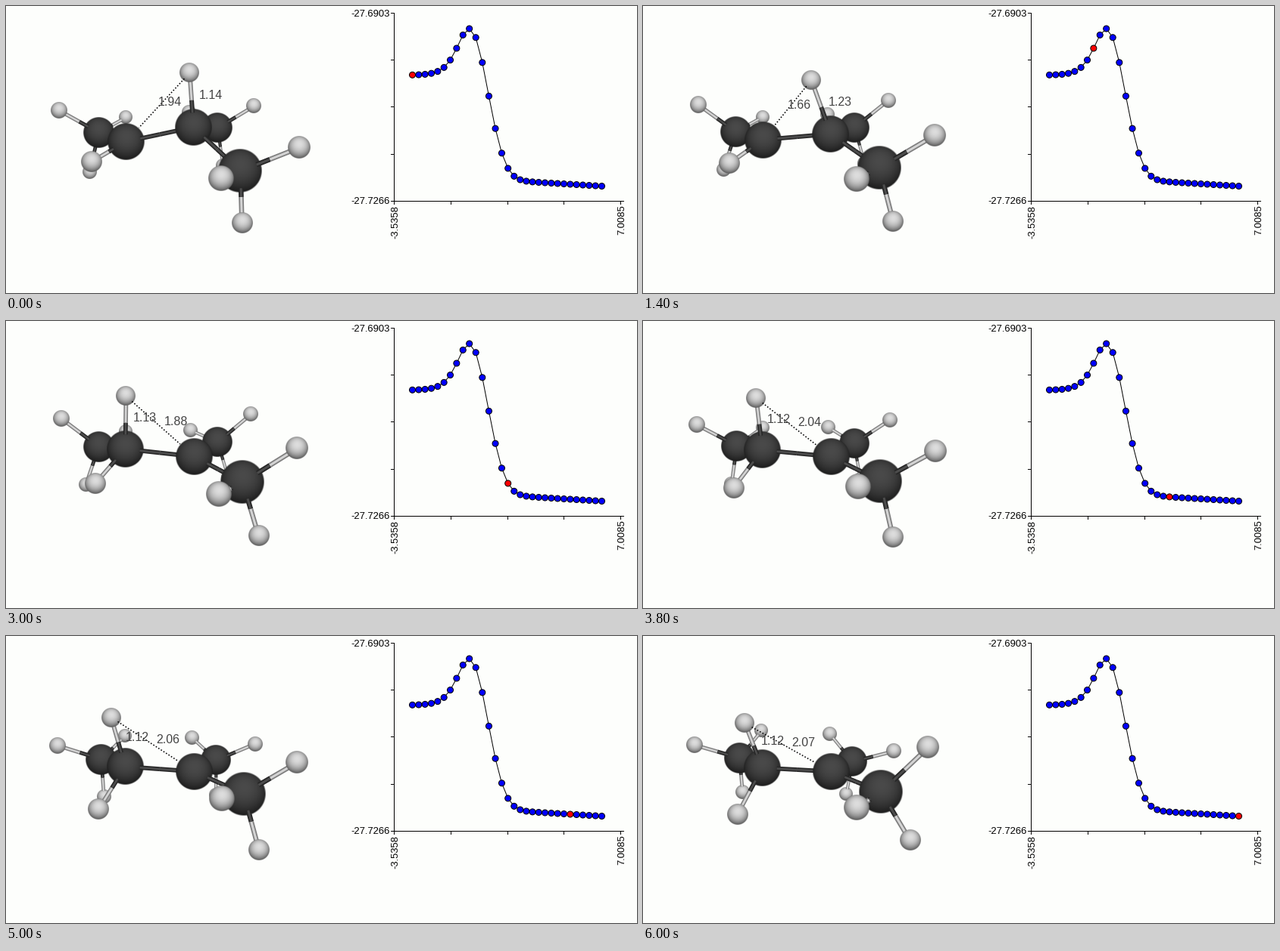
These frames come from a looping animation (833x380 px, 6200 ms). A matplotlib script:

```python
import numpy as np
import matplotlib.pyplot as plt
from matplotlib.animation import FuncAnimation

W, H, DPI = 833, 380, 100
FRAMES, STEP = 31, 200
HOP_END, SWING_END = 15, 23
PT = 72 / DPI
T = np.arange(FRAMES)

plt.rcParams["font.family"] = "Liberation Sans"
fig = plt.figure(figsize=(W / DPI, H / DPI), dpi=DPI, facecolor="#fdfefc")
ax = fig.add_axes([0, 0, 1, 1])
ax.set_xlim(-0.5, W - 0.5)
ax.set_ylim(H - 0.5, -0.5)
ax.axis("off")


# Easings for the first half of the motion
def settle(t):
    return 1 - (1 - t) ** 3


def steady(t):
    return t


def hop(t):
    u = t ** 1.5
    return u * u * (3 - 2 * u)


STOPS = {2: (0, HOP_END), 3: (0, HOP_END, FRAMES - 1),
         4: (0, HOP_END, SWING_END, FRAMES - 1)}


def travel(points, ease):
    """Eased into the second pose, then steady through the later ones."""
    time = np.where(T < HOP_END, HOP_END * ease(np.minimum(T / HOP_END, 1)), T)
    return np.column_stack([np.interp(time, STOPS[len(points)], c)
                            for c in zip(*points)])


def sphere(lo, hi, n=72):
    """Shaded ball with a soft highlight just above its centre."""
    y, x = np.mgrid[-1:1:n * 1j, -1:1:n * 1j]
    r = np.hypot(x, y)
    z = np.sqrt(np.clip(1 - r ** 2, 0, 1))
    light = np.clip(0.02 * x - 0.3 * y + 0.95 * z, 0, 1)
    img = np.empty((n, n, 4))
    img[..., :3] = (lo + (hi - lo) * light ** 1.3)[..., None]
    img[..., 3] = np.clip((1 - r) * n / 4 + 0.5, 0, 1)
    return img


BALLS = {"C": sphere(0.12, 0.29), "H": sphere(0.38, 0.87)}
TUBES = {"C": ("#262626", "#4c4c4c"), "H": ("#808080", "#d4d4d4")}


class Atom:
    def __init__(self, kind, radius, depth, *points, ease=settle):
        self.kind, self.r, self.z = kind, radius, depth
        self.path = travel(points, ease)
        self.img = ax.imshow(BALLS[kind], extent=(0, 1, 1, 0), aspect="auto",
                             interpolation="hanning", zorder=depth)

    def place(self, i):
        x, y = self.path[i]
        r = self.r + 0.5
        self.img.set_extent((x - r, x + r, y + r, y - r))


class Bond:
    """Two-tone tube, each half in the tone of its atom."""

    def __init__(self, a, b):
        self.far, self.near = sorted((a, b), key=lambda p: p.z)
        width = 4 + 0.2 * self.far.z
        self.parts = []
        for atom in (self.far, self.near):
            for color, w in zip(TUBES[atom.kind], (width, width * 0.45)):
                line, = ax.plot([], [], color=color, lw=w * PT,
                                solid_capstyle="butt", zorder=self.far.z + 0.5)
                self.parts.append(line)

    def place(self, i, visible=True):
        p, q = self.far.path[i], self.near.path[i]
        mid = (p + q) / 2
        d = q - p
        start = p + d * min(0.45, 0.8 * self.far.r / np.hypot(*d))
        for k, line in enumerate(self.parts):
            a, b = (start, mid) if k < 2 else (mid, q)
            line.set_data([a[0], b[0]], [a[1], b[1]])
            line.set_visible(visible)


# Carbons, with depth growing toward the viewer
c_back = Atom("C", 19.5, 5, (279, 161), (279, 160), (276, 166))
c_left = Atom("C", 20, 6, (122, 167), (122, 166), (127, 161))
c_donor = Atom("C", 24, 9, (158, 179), (157, 169), (157, 174), ease=hop)
c_mid = Atom("C", 24, 10, (247, 160), (248, 179), ease=steady)
c_front = Atom("C", 28.5, 13, (309, 218), (312, 213), (314, 206))

# Hydrogen that hops between two carbons along a slight arc
h_hop = Atom("H", 12.5, 11, (242, 88), (158, 99), (140, 104), (134, 115),
             ease=hop)
h_hop.path[:, 1] += 7 * np.sin(np.pi * np.minimum(T / HOP_END, 1))

# Hydrogens that stay with their carbon
holders = [
    (c_back, [Atom("H", 8.5, 1, (286, 211), (293, 207), (280, 210), (268, 209)),
              Atom("H", 8.8, 2, (241, 140), (243, 144), (246, 129)),
              Atom("H", 9.5, 8, (327, 132), (323, 123), (331, 152))]),
    (c_left, [Atom("H", 8.5, 3, (158, 147), (158, 146), (156, 125)),
              Atom("H", 9, 4, (110, 219), (105, 216), (128, 214), (131, 206)),
              Atom("H", 10.5, 7, (70, 138), (73, 129), (68, 145), (68, 144))]),
    (c_donor, [Atom("H", 13.3, 12, (112, 206), (117, 215), (124, 236),
                    ease=hop)]),
    (c_front, [Atom("H", 13.2, 14, (311, 287), (333, 284), (326, 288), (352, 270)),
               Atom("H", 14.5, 15, (387, 187), (384, 168), (387, 175), (376, 147)),
               Atom("H", 16.5, 16, (284, 228), (281, 229), (286, 209), (282, 227))]),
]
carbons = [c_back, c_left, c_donor, c_mid, c_front]
atoms = carbons + [h_hop] + [h for _, hs in holders for h in hs]
bonds = [Bond(c, h) for c, hs in holders for h in hs]
bonds += [Bond(c_left, c_donor)] + [Bond(c_mid, c)
                                    for c in (c_donor, c_back, c_front)]

# Measured distances to the hopping hydrogen
ends = (c_donor, c_mid)
hop_bonds = [Bond(c, h_hop) for c in ends]
lengths = (np.interp(T, [0, 7, 15, 19], [1.94, 1.66, 1.13, 1.12]),
           np.interp(T, [0, 7, 15, 19, 23, 27],
                     [1.14, 1.23, 1.88, 2.04, 2.05, 2.07]))
labels = [ax.text(0, 0, "", fontsize=16 * PT, color="#444444", zorder=31)
          for _ in ends]
dots, = ax.plot([], [], color="black", lw=1.6 * PT, ls=(0, (1, 1.5)),
                dash_capstyle="butt", zorder=30)


# Energy plot
def stroke(xs, ys):
    ax.plot(xs, ys, color="black", lw=PT, zorder=1, snap=True)


LEFT, TOP, BASE = 512, 8, 257
stroke([LEFT, LEFT], [TOP, BASE])
stroke([LEFT, 815], [BASE, BASE])
for k in range(5):
    y, x = round(TOP + (BASE - TOP) * k / 4), round(LEFT + 74.8 * k)
    stroke([LEFT - 4, LEFT], [y, y])
    stroke([x, x], [BASE, BASE + 4])
SIZE = 13 * PT
for y, s in ((TOP, "-27.6903"), (BASE, "-27.7266")):
    ax.text(506, y + 5, s, fontsize=SIZE, ha="right", va="baseline")
for x, s in ((LEFT, "-3.5358"), (LEFT + 299, "7.0085")):
    ax.text(x + 8, BASE + 6, s, fontsize=SIZE, rotation=90, ha="right", va="top")

PEAK = 9
d = T - PEAK
px = 536 + 250 * T / (FRAMES - 1) + 1.3 * np.exp(-((T - 14) / 3.5) ** 2)
rise = 91 - 61.5 / np.cosh(d / 2.58) ** 2
fall = 227.5 + 0.5 * d - 198 * np.exp(-(np.abs(d) / 3.87) ** 2.1)
py = np.where(d < 0, rise, fall)
ax.plot(px, py, color="black", lw=PT, zorder=2)
points = ax.scatter(px, py, s=(8 * PT) ** 2, c="#0000ff", edgecolors="black",
                    linewidths=PT, zorder=3)


def draw(i):
    for part in atoms + bonds:
        part.place(i)
    h = h_hop.path[i]
    bonded = int(lengths[1][i] <= lengths[0][i])
    for k, carbon in enumerate(ends):
        hop_bonds[k].place(i, k == bonded)
        c = carbon.path[i]
        x, y = (h + c) / 2
        shift = 10 if k == bonded else 5 * k
        labels[k].set_position((x + shift, y - 1.5))
        labels[k].set_text(f"{lengths[k][i]:.2f}")
        if k != bonded:
            u = (c - h) / np.hypot(*(c - h))
            a, b = h + u * (h_hop.r - 2), c - u * (carbon.r + 1)
            dots.set_data([a[0], b[0]], [a[1], b[1]])
    points.set_facecolor(["#ff0000" if k == i else "#0000ff" for k in T])
    return []


anim = FuncAnimation(fig, draw, frames=FRAMES, interval=STEP, repeat=True,
                     repeat_delay=0, blit=False)
plt.show()
```
